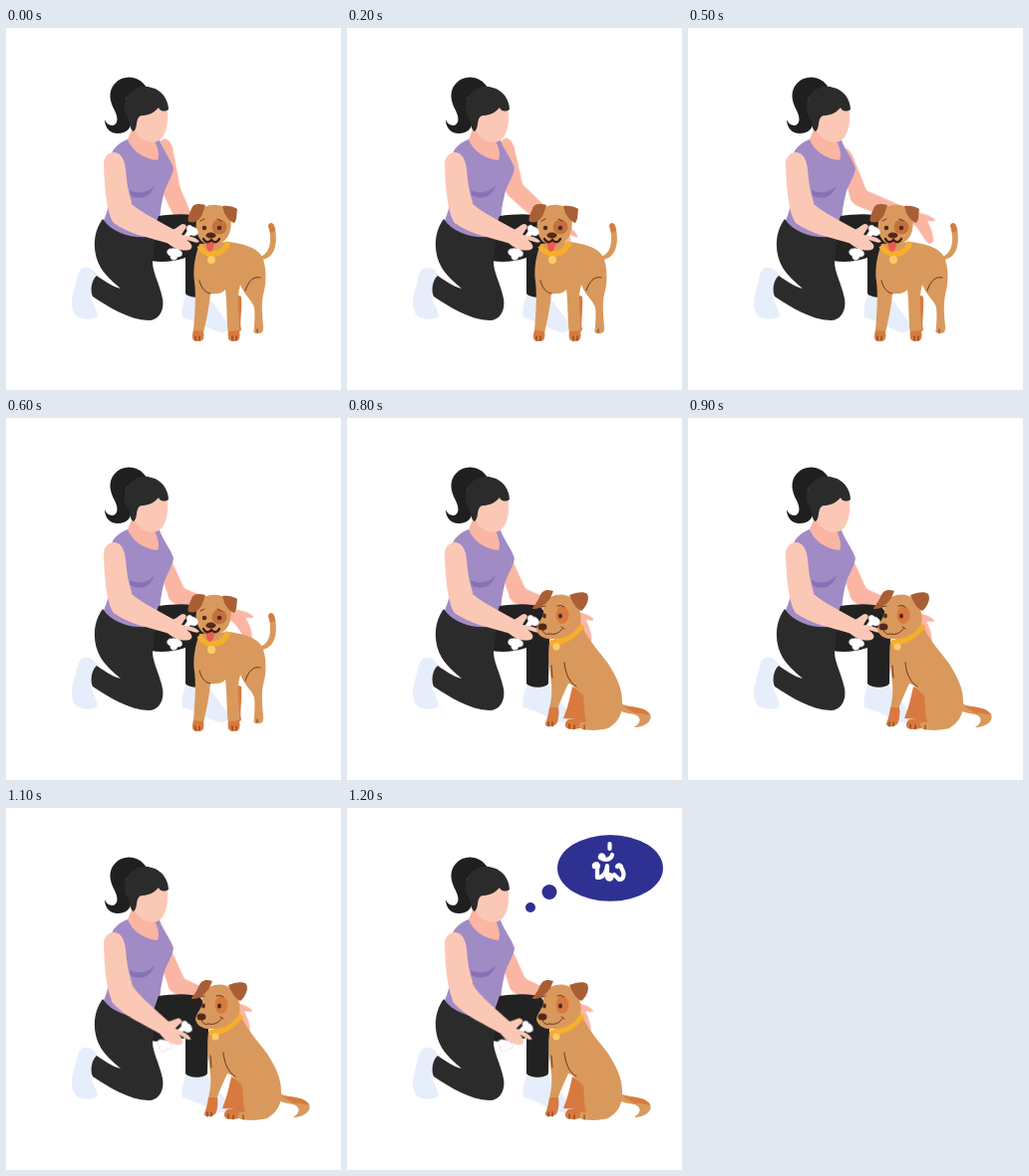
Animation of 336x364 px, one loop 2200 ms. Source, as an HTML page:

```html
<!DOCTYPE html>
<html lang="th">
<head>
<meta charset="utf-8">
<title>Sit</title>
<style>
html, body { margin: 0; width: 100%; height: 100%; overflow: hidden; background: #fff; }
svg { display: block; width: 100vw; height: 100vh; }
.dark { fill: #2b2b2b; }
.darker { fill: #222; }
.skin { fill: #fbc8b6; }
.shade { fill: #fab5a3; }
.sock { fill: #e7eefb; }
.fur { fill: #d9995c; }
.ear { fill: #a95f35; }
.rust { fill: #d87a3f; }
.nose { fill: #54291c; }
.collar { fill: none; stroke: #f6ae2d; stroke-width: 5.5; }
.tag { fill: #fbcb68; }
.line { fill: none; stroke: #6d351f; stroke-width: 1; stroke-linecap: round; }
.mouth { stroke: #3d1e18; stroke-width: 2.4; }
.blue { fill: #2e3192; }

/* Every part moves on a 100 ms beat of the 2200 ms loop. */
.elbow, .upper, .forearm, .treat, .stand, .sit, .thought { animation: 2200ms step-end infinite; }
.elbow { animation-name: elbow; }
.upper { animation-name: upper; }
.forearm { animation-name: forearm; }
.treat { animation-name: treat; transform-origin: 112px 187px; }
.stand { animation-name: stand; }
.sit { animation-name: sit; }
.thought { animation-name: thought; }
@keyframes elbow {
  0% { transform: translate(166px, 163px); }
  4.54% { transform: translate(167px, 162px); }
  9.09% { transform: translate(168px, 162px); }
  13.63% { transform: translate(170px, 162px); }
  18.18% { transform: translate(171px, 163px); }
  22.72% { transform: translate(172px, 170px); }
  27.27%, 100% { transform: translate(172px, 178px); }
}
@keyframes upper {
  0% { transform: rotate(-8deg); }
  9.09% { transform: rotate(-10deg); }
  13.63% { transform: rotate(-13deg); }
  18.18% { transform: rotate(-16deg); }
  22.72% { transform: rotate(-19deg); }
  27.27%, 100% { transform: rotate(-22deg); }
}
@keyframes forearm {
  0% { transform: rotate(64deg); }
  4.54% { transform: rotate(52deg); }
  9.09% { transform: rotate(41deg); }
  13.63% { transform: rotate(31deg); }
  18.18% { transform: rotate(22deg); }
  22.72% { transform: rotate(21deg); }
  27.27% { transform: rotate(20deg); }
  31.81% { transform: rotate(21deg); }
  36.36% { transform: rotate(22deg); }
  40.9%, 100% { transform: rotate(23deg); }
}
@keyframes treat {
  0% { transform: rotate(0deg); }
  45.45% { transform: rotate(6.5deg); }
  50%, 100% { transform: rotate(13deg); }
}
@keyframes stand { 0% { visibility: visible; } 31.81%, 100% { visibility: hidden; } }
@keyframes sit { 0% { visibility: hidden; } 31.81%, 100% { visibility: visible; } }
@keyframes thought { 0% { visibility: hidden; } 54.54%, 100% { visibility: visible; } }
</style>
</head>
<body>
<svg viewBox="0 0 336 364">
  <g id="woman">
    <path fill="#1f1f20" d="M141 60C134 48 118 46 109 56C102 64 104 74 109 83C113 91 112 97 107 98C103 98 100 95 99 92C99 100 104 106 112 106C121 106 127 100 125 92C122 84 118 78 121 70Z"/>
    <path class="sock" d="M92 250C89 243 84 240 78 241C71 243 72 252 68 264C65 273 65 285 71 290C78 294 88 293 92 290C91 282 86 276 85 270Z"/>
    <path class="sock" d="M181 267C178 275 175 284 177 291C190 294 203 303 214 306C222 307 224 302 222 296L202 269Z"/>

    <g class="elbow">
      <path class="upper shade" d="M-9 0L-7-44Q-5-52 0-52Q5-52 7-42L9 0Q0 10-9 0Z"/>
      <path class="forearm shade" d="M0-9C20-8 45-7 58-6C64-7 70-9 79-6C80-4 76-3 72-2C78 3 84 10 85 15C84 20 80 19 76 16C70 12 66 8 60 6C40 9 18 10 0 9Q-9 8-9 0Q-8-9 0-9Z"/>
    </g>

    <path class="shade" d="M127 100L122 112C125 125 138 134 153 134L154 126L150 111Z"/>
    <path fill="#a18bc5" d="M122 112C126 123 138 132 152 133C155 127 151 118 149 113L154 113C158 124 165 131 168 141C167 150 160 158 158 168C155 180 155 186 154 192L150 211C130 214 108 208 97 196C102 183 104 178 103 165C100 150 103 130 108 122C113 116 117 114 122 112Z"/>
    <path fill="#8871b5" d="M124 163C132 167 143 166 149 158C146 170 133 174 125 168Z"/>
    <path class="darker" d="M153 189C168 187 185 186 194 190C202 198 204 215 203 225L202 267C199 272 184 272 180 267L180 231C168 235 156 236 145 234L146 209Z"/>
    <path class="dark" d="M97 192C87 205 86 226 95 241C102 252 112 259 115 262C106 260 97 253 91 249C86 253 84 264 87 270C104 281 122 293 143 294C154 294 159 283 157 272C154 257 147 246 147 235L150 209C130 213 108 208 97 192Z"/>
    <path class="skin" d="M129 103C128 92 131 87 137 87C143 87 149 82 153 79C157 82 160 83 162 83C163 95 161 106 155 112C150 116 143 115 139 113C133 110 131 107 129 103Z"/>
    <path class="dark" d="M119 76C122 62 135 56 146 60C156 62 163 72 163 82C158 85 154 83 153 80C148 86 142 88 136 88C129 90 133 100 128 104C124 103 125 95 122 90C119 86 118 81 119 76Z"/>
  </g>

  <g class="stand">
    <path class="rust" d="M228 267L236 270C237 285 234 297 236 303C235 307 228 307 228 304Z"/>
    <path class="fur" d="M253 230C264 229 268 215 263 198C266 194 269 196 270 202C273 220 268 232 256 233Z"/>
    <path class="rust" d="M263 199C265 194 269 196 270 204L265 206Z"/>
    <path class="fur" d="M194 217C190 228 187 242 189 255C191 270 189 290 188 306C186 312 187 315 192 315C198 315 199 313 198 307C201 293 204 280 205 267C211 268 217 267 220 263C222 278 221 295 223 308C222 314 225 315 229 315C234 315 235 312 234 306C235 290 230 275 235 258C240 270 247 274 249 281C250 290 249 298 249 302C247 306 250 308 254 307C258 307 258 304 258 300C257 288 256 278 258 268C262 255 261 240 257 230C250 219 236 217 224 215Z"/>
    <path class="rust" d="M188 304L198 305Q200 315 192 315Q185 315 188 304ZM223 305L234 304Q236 315 229 315Q221 315 223 305Z"/>
    <path class="line" d="M194 254C196 262 200 266 205 267M255 251C248 249 243 255 240 264M190 310v4M194 310v4M227 310v4M231 310v4M252 303v3"/>
    <path class="collar" d="M194 219C199 230 217 231 223 215"/>
    <circle class="tag" cx="206" cy="233" r="4"/>
    <path class="fur" d="M193 186C198 176 216 175 223 184C228 194 226 208 219 214C212 219 199 219 195 213C189 205 190 194 193 186Z"/>
    <path class="ear" d="M200 178C192 176 187 177 186 182C183 188 181 194 184 195C190 197 195 192 197 187ZM217 179C223 178 229 180 232 182C231 188 232 192 229 196C225 195 221 190 219 186Z"/>
    <circle cx="214" cy="200" r="7.5" fill="#c4703f"/>
    <path class="line" d="M195 194l4-2M212 192l4 2"/>
    <circle class="nose" cx="199" cy="201" r="2.3"/>
    <circle class="nose" cx="214" cy="201" r="2.3"/>
    <ellipse class="nose" cx="205.5" cy="208.5" rx="5" ry="3"/>
    <path fill="#ed5b4e" d="M201 215L209 215C209 221 207 225 204 225C201 224 201 219 201 215Z"/>
    <path class="line mouth" d="M198 212Q201 218 206 213Q211 218 214 212"/>
  </g>

  <g id="front-arm">
    <path class="skin" d="M98 140C97 129 103 125 109 125C116 126 119 133 120 142C121 153 122 164 126 175C125 190 118 200 108 196C101 186 99 162 98 140Z"/>
    <g class="treat">
      <path class="skin" d="M122 172C128 182 150 192 169 203L164 217C145 211 122 207 108 196Q104 184 122 172Z"/>
      <path fill="#fff" stroke="#d9d9de" stroke-width=".7" d="M182 204C179 200 184 196 187 200C191 200 195 206 191 208C188 210 186 208 185 208L173 223C178 224 178 231 172 230C171 235 164 234 165 229C160 228 161 221 166 222Q168 221 170 222Z"/>
      <path class="skin" d="M160 204C168 205 171 200 177 197C181 197 182 200 179 203L176 208C181 209 190 209 194 215C190 217 186 214 181 213C187 217 188 221 184 223C177 225 168 222 162 216Z"/>
    </g>
  </g>

  <g class="sit">
    <path class="fur" d="M274 287C285 292 298 289 304 298C307 305 298 311 288 311C296 306 295 300 288 298C282 297 277 296 272 294Z"/>
    <path class="rust" d="M277 290C287 291 298 290 304 298C299 299 296 296 289 297Z"/>
    <path class="rust" d="M226 270C223 284 221 292 217 302L242 304L241 278Z"/>
    <path class="fur" d="M203 225C201 242 204 255 205 268C206 280 204 286 203 293L211 293C214 284 218 276 222 267C227 268 231 274 237 279L239 304L234 312C242 315 255 314 262 312C272 306 277 297 276 285C276 271 270 260 262 247C254 236 244 226 236 210Z"/>
    <path class="rust" d="M203 291L212 291C213 297 212 302 211 306C209 311 198 312 199 307C201 302 202 298 203 291ZM222 303C216 308 219 314 227 313C235 313 241 309 240 303Z"/>
    <path class="fur" d="M234 306C231 313 236 314 246 313L254 305Z"/>
    <path class="line" d="M218 246C219 256 222 265 230 270M202 306v4M206 306v4M223 308v4M228 309v4M238 309v4M205 249l1 12"/>
    <path class="collar" style="stroke-width:6" d="M204 226Q224 225 236 208"/>
    <circle class="tag" cx="210" cy="230" r="3.6"/>
    <path class="fur" d="M204 180C212 176 220 177 225 181C233 188 236 198 234 207C228 217 218 223 207 222C198 223 191 219 190 212C191 206 196 202 197 196C197 189 199 183 204 180Z"/>
    <path class="ear" d="M207 174C200 172 196 173 193 180C190 187 186 190 186 192C193 193 200 187 204 181ZM223 178C230 175 238 174 241 177C244 183 239 191 235 194C229 191 226 185 223 178Z"/>
    <ellipse class="rust" cx="216" cy="198" rx="6.5" ry="9"/>
    <ellipse class="nose" cx="198" cy="199" rx="1.8" ry="2.4"/>
    <ellipse class="nose" cx="214" cy="199" rx="2" ry="2.5"/>
    <ellipse class="nose" cx="196" cy="210" rx="4.5" ry="3.5"/>
    <path class="line" d="M196 213Q198 219 203 217Q211 219 216 212M215 210l3 2M195 190l4-1M211 189q4-2 7 1"/>
  </g>

  <g class="thought">
    <ellipse class="blue" cx="264" cy="60.4" rx="53" ry="33.3"/>
    <circle class="blue" cx="203" cy="84.5" r="7.5"/>
    <circle class="blue" cx="184" cy="100" r="5"/>
    <g role="img" aria-label="นั่ง" fill="none" stroke="#fff" stroke-width="4.2" stroke-linecap="round" stroke-linejoin="round">
      <path d="M248 59a2 2 0 1 1 3 1V70C256 70 260 67 261 58V69a2.3 2.3 0 1 0 2-2"/>
      <path d="M254 50a1.8 1.8 0 1 1 2 1C261 53 265 51 266 47M263.500 36V41"/>
      <path d="M271 59a2 2 0 1 1 4 1C279 66 278 72 273 72L268 67"/>
    </g>
  </g>
</svg>
</body>
</html>
```
